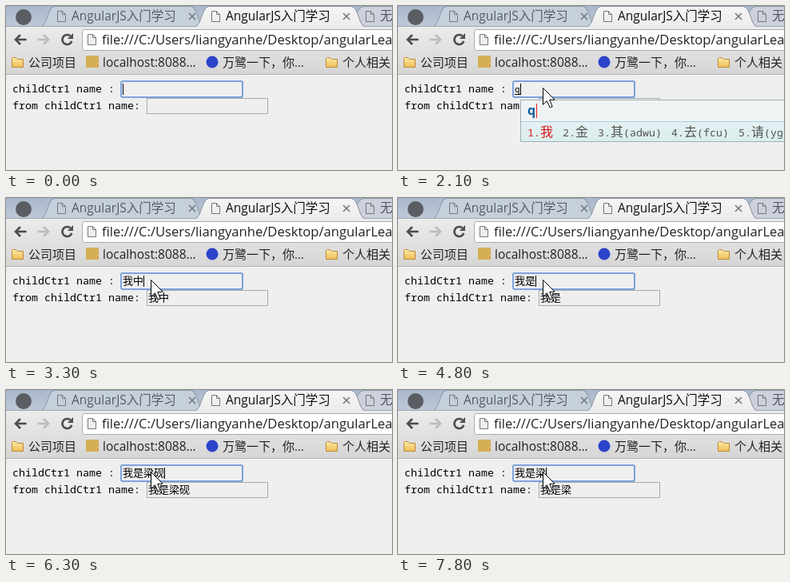
An HTML page with a canvas for the animation above (8 s loop, 483x205 px).

```html
<!DOCTYPE html>
<html lang="zh">
<head>
<meta charset="utf-8">
<style>
html, body { margin: 0; width: 483px; height: 205px; overflow: hidden; background: #efefef; }
canvas { display: block; }
</style>
</head>
<body>
<canvas id="stage" width="483" height="205"></canvas>
<script>
const ctx = document.getElementById('stage').getContext('2d');
const LOOP = 8000;
const PAGE = '#efefef';
const SANS = '"Open Sans", "Noto Sans CJK SC", "Noto Sans CJK", sans-serif';
const MONO = '"Noto Sans Mono", monospace';
const CJK = '"Noto Sans CJK SC", "Noto Sans CJK", sans-serif';

const CANDIDATES = {
  q: ['我', '金', '其(adwu)', '去(fcu)', '请(yge)'],
  s: ['要', '木', '想(shnu)', '本(sg)', '可(sk)'],
  ss: ['梁', '梦q', '梦想sh', '禁止hh', '木ss'],
  dm: ['砚', '面m', '万能ce', '页码dc', '石dg'],
  t: ['和', '的', '我们wu', '年(rh)', '生(tg)'],
  tt: ['禾', '笔t', '等待ff', '微笑tt', '行tf']
};

// start time, committed text, typed code, caret shown, input popup shown
const STEPS = [
  [0, '', '', 1, 0],
  [300, '', '', 0, 0],
  [900, '', '', 1, 0],
  [1200, '', '', 0, 0],
  [1500, '', '', 1, 0],
  [2100, '', 'q', 1, 1],
  [2400, '', 'q', 1, 0],
  [2700, '我', '', 1, 0],
  [3000, '我', 'k', 1, 0],
  [3300, '我中', '', 1, 0],
  [3600, '我中', '', 0, 0],
  [3900, '我', '', 1, 0],
  [4500, '我', '', 0, 0],
  [4800, '我是', '', 1, 0],
  [5100, '我是', 's', 1, 1],
  [5700, '我是', 'ss', 1, 1],
  [6000, '我是梁', 'dm', 1, 1],
  [6300, '我是梁砚', '', 1, 0],
  [6600, '我是梁砚', 't', 1, 1],
  [6900, '我是梁砚', 'tt', 1, 1],
  [7200, '我是梁砚禾', '', 1, 0],
  [7500, '我是梁砚禾', '', 0, 0],
  [7800, '我是梁', '', 1, 0]
];

function rect(x, y, w, h, fill) {
  ctx.fillStyle = fill;
  ctx.fillRect(x, y, w, h);
}

function box(x, y, w, h, r, fill, stroke, width = 1) {
  ctx.beginPath();
  ctx.roundRect(x, y, w, h, r);
  paint(fill, stroke, width);
}

function paint(fill, stroke, width = 1) {
  if (fill) { ctx.fillStyle = fill; ctx.fill(); }
  if (stroke) { ctx.strokeStyle = stroke; ctx.lineWidth = width; ctx.stroke(); }
}

function shape(points, fill, stroke, width, close = true) {
  ctx.beginPath();
  points.forEach(([x, y]) => ctx.lineTo(x, y));
  if (close) ctx.closePath();
  paint(fill, stroke, width);
}

function circle(x, y, r, fill) {
  ctx.beginPath();
  ctx.arc(x, y, r, 0, 7);
  paint(fill);
}

function label(text, x, y, size, fill) {
  ctx.font = `${size}px ${SANS}`;
  ctx.fillStyle = fill;
  ctx.fillText(text, x, y);
}

// Fixed-pitch text with separate Latin and Chinese advances; returns the end x.
function grid(text, x, y, latin, wide, fill, weight = 400) {
  ctx.fillStyle = fill;
  for (const ch of text) {
    const isLatin = ch < '\u0100';
    ctx.font = `${weight} ` + (isLatin ? `${latin / 0.6}px ${MONO}` : `${wide}px ${CJK}`);
    ctx.fillText(ch, x, y);
    x += isLatin ? latin : wide;
  }
  return x;
}

function vertical(y0, y1, ...stops) {
  const g = ctx.createLinearGradient(0, y0, 0, y1);
  stops.forEach((c, i) => g.addColorStop(i / (stops.length - 1), c));
  return g;
}

function pageIcon(x, y, fill) {
  shape([[x, y], [x + 6, y], [x + 10, y + 4], [x + 10, y + 13], [x, y + 13]], fill, '#777', 1);
  shape([[x + 6, y], [x + 6, y + 4], [x + 10, y + 4]], null, '#777', 1, false);
}

function folder(x, y) {
  shape([[x, y + 1], [x + 1, y], [x + 5, y], [x + 7, y + 2], [x + 14, y + 2], [x + 14, y + 12], [x, y + 12]],
    vertical(y, y + 12, '#ffe9a6', '#f0bd55'), '#b98a35', 1);
}

function tab(x, w, title, fill, ink, cross) {
  const r = x + w;
  ctx.beginPath();
  ctx.moveTo(x, 25.5);
  ctx.bezierCurveTo(x + 8, 24, x + 8, 1, x + 17, .5);
  ctx.lineTo(r - 17, .5);
  ctx.bezierCurveTo(r - 8, 1, r - 8, 24, r, 25.5);
  paint(fill, '#8794a4');
  pageIcon(x + 20.5, 6.5, fill);
  label(title, x + 38, 18, 15.5, ink);
  if (!cross) return;
  for (const d of [-4, 4]) shape([[cross - 4, 13 - d], [cross + 4, 13 + d]], null, '#777d85', 1.7, false);
}

function arrow(x, dir, color) {
  const line = pts => shape(pts.map(([a, b]) => [x + a * dir, 42 + b]), null, color, 2.6, false);
  line([[-6, 0], [7.5, 0]]);
  line([[0, -6], [-6, 0], [0, 6]]);
}

function browser() {
  rect(0, 0, 483, 26, vertical(0, 26, '#a9b8ca', '#bdc9d8'));
  circle(22, 14, 10, '#5a5d62');
  tab(430, 200, '无', '#cdd1dd', '#555b63');
  tab(44, 204, 'AngularJS入门学习', '#c6d0dd', '#555b63', 233);
  rect(0, 25, 483, 61, vertical(25, 86, '#ececec', '#d5d5d5'));
  rect(0, 25, 483, 1, '#9da8b5');
  tab(237, 212, 'AngularJS入门学习', vertical(0, 26, '#f5f5f5', '#ececec'), '#111', 426);
  rect(239, 25, 208, 2, '#ececec');

  arrow(18, 1, '#4c4c4c');
  arrow(47, -1, '#bcbcbc');
  ctx.beginPath();
  ctx.arc(76.5, 42, 6, .3, 5.4);
  paint(null, '#4c4c4c', 2.6);
  shape([[84, 34], [84, 41], [77, 41]], '#4c4c4c');

  box(95.5, 29.5, 420, 26, 3, '#fff', '#aaa');
  pageIcon(102.5, 35.5, '#eee');
  label('file:///C:/Users/liangyanhe/Desktop/angularLearn', 120, 48, 16.6, '#222');

  folder(7.5, 64.5);
  label('公司项目', 28, 76, 15, '#222');
  rect(100, 62, 16, 15, '#d3ae55');
  label('localhost:8088…', 121, 76, 15.5, '#222');
  circle(258, 70, 7.5, '#2b45c9');
  label('万鹭一下，你…', 271, 76, 15, '#222');
  folder(400.5, 64.5);
  label('个人相关', 421, 76, 15, '#222');
  rect(0, 85, 483, 1, '#b8b8b8');
}

function popup(x, code) {
  box(x + .5, 117.5, 400, 52, 0, '#f0f3f4', '#9fb0b8');
  rect(x + 1, 144, 400, 25, vertical(144, 169, '#e4f0f1', '#daeeee'));
  rect(x + 1, 144, 400, 1, '#a9cfe0');
  ctx.font = `bold 16px ${SANS}`;
  ctx.fillStyle = '#0b5c9e';
  ctx.fillText(code, x + 9, 136);
  rect(Math.round(x + 10 + ctx.measureText(code).width), 122, 1, 18, code === 'q' ? '#e22' : '#456');
  let end = x + 9;
  CANDIDATES[code].forEach((word, i) => {
    end = grid(`${i + 1}.${word}`, end, 163, 8, 16, i ? '#555' : '#e01818', 300) + 12;
  });
}

function pointer(x, y) {
  const outline = [[0, 0], [0, 17], [4, 13.3], [7, 20], [9.6, 19], [6.7, 12.3], [12, 12]];
  shape(outline.map(([a, b]) => [x + .5 + a * 1.22, y + .5 + b * 1.22]), '#fff', '#000', 1);
}

function draw(t) {
  const [, text, code, caretOn, popupOn] = STEPS.findLast(step => step[0] <= t);
  rect(0, 0, 483, 205, PAGE);
  browser();

  grid('childCtr1 name :', 8, 108, 8, 16, '#000');
  grid('from childCtr1 name:', 8, 129, 8, 16, '#000');
  box(144, 94, 152, 20, 2, PAGE, '#7da2dc', 2);
  box(176.5, 115.5, 151, 19, 0, PAGE, '#a9a9a9');

  const codeX = grid(text, 146, 108, 6.5, 13, '#000');
  const caretX = Math.round(grid(code, codeX, 108, 6.5, 13, '#000'));
  rect(codeX, 110, caretX - codeX, 1, '#000');
  if (caretOn) rect(caretX, 97, 1, 14, '#000');
  grid(text, 178, 129, 6.5, 13, '#000');

  if (popupOn) popup(caretX, code);
  if (t >= 600) pointer(181, 102);
  else if (t >= 300) pointer(229, 154);
}

function tick() {
  draw(performance.now() % LOOP);
  requestAnimationFrame(tick);
}
tick();
</script>
</body>
</html>
```
